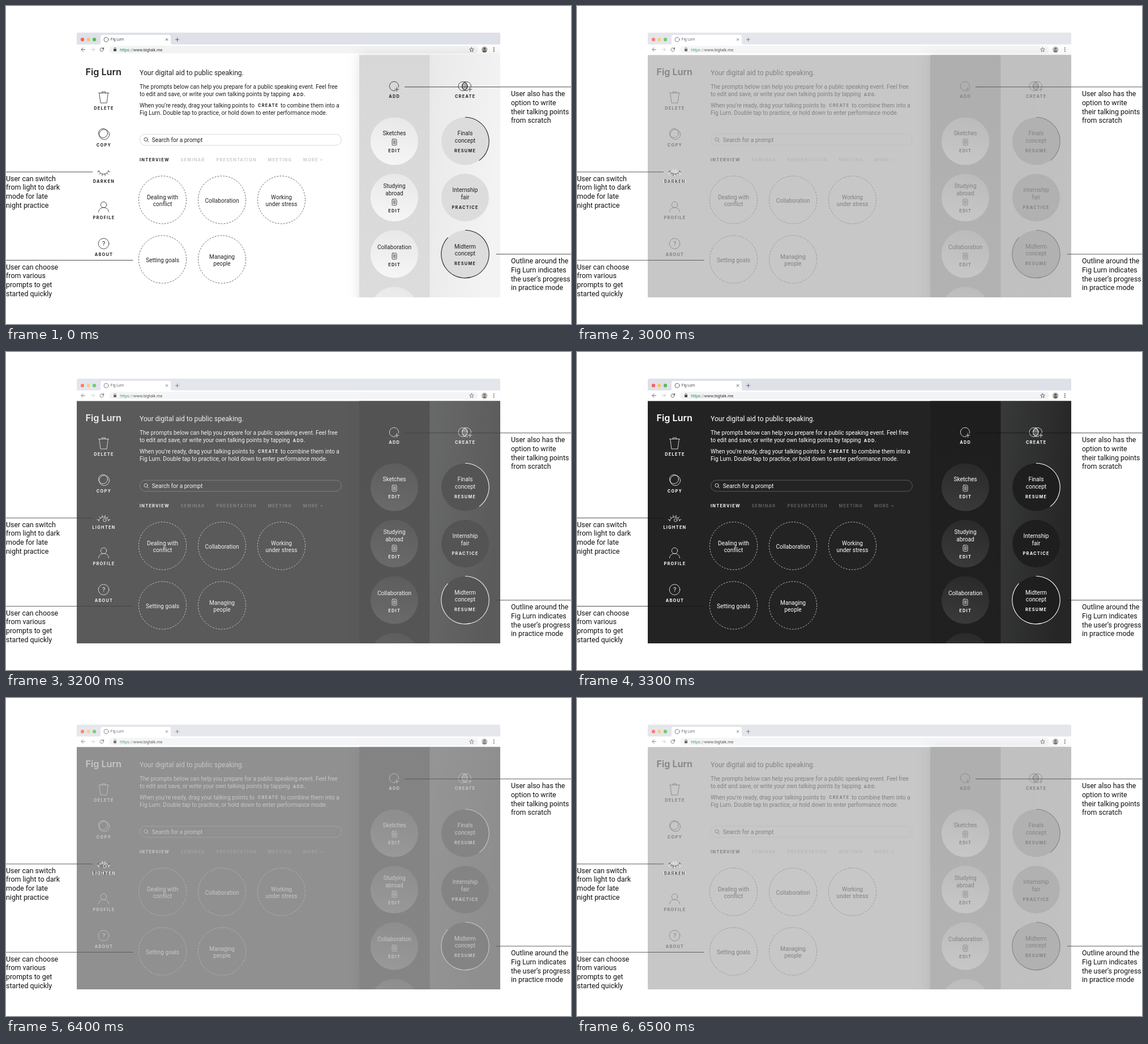
These frames come from a looping animation (998x561 px, 6.6 s). An HTML page:

```html
<!DOCTYPE html>
<html lang="en">
<head>
<meta charset="utf-8">
<title>Light and dark mode</title>
<style>
html, body { margin: 0; width: 100%; height: 100%; overflow: hidden; background: #fff; }
svg { display: block; width: 100%; height: 100%; }
text { font-family: Roboto, sans-serif; white-space: pre; }
.body { font-size: 10.15px; }
.head { font-size: 12.1px; }
.logo { font: 600 16.2px Inter, sans-serif; }
.cap { font: 700 7.3px Inter, sans-serif; letter-spacing: 1.3px; }
.note { font-size: 12.45px; fill: #111; }
.mid { text-anchor: middle; }
.icon { fill: none; stroke-width: .8; stroke-linecap: round; stroke-linejoin: round; }
</style>
</head>
<body>
<svg id="stage" viewBox="0 0 998 561" xmlns="http://www.w3.org/2000/svg"></svg>
<script>
const NAME = 'Fig Lurn';

const themes = {
  light: {
    ink: '#222', page: '#fff', tab: '#cbcbcb', field: '#d4d4d4',
    add: ['#d7d7d7', '#dcdcdc'], create: ['#e9e9e9', '#f3f3f3'],
    card: ['#e8e8e8', '#f6f6f6'], talk: '#dcdcdc', mode: 'DARKEN'
  },
  dark: {
    ink: '#fff', page: '#232323', tab: '#606060', field: '#626262',
    add: ['#1e1e1e', '#202020'], create: ['#383a39', '#262626'],
    card: ['#2a2a2a', '#3a3a3a'], talk: '#1e1e1e', mode: 'LIGHTEN'
  }
};

const text = (x, y, s, cls, extra = '') =>
  `<text x="${x}" y="${y}" class="${cls}" ${extra}>${s}</text>`;
const mid = (x, y, s) => text(x, y, s, 'body mid');
// the trailing letter space shifts centred capitals by half its width
const cap = (x, y, s) => text(x + .65, y, s, 'cap mid');
const circle = (x, y, r, extra = '') => `<circle cx="${x}" cy="${y}" r="${r}" ${extra}/>`;
const rect = (x, y, w, h, extra = '') =>
  `<rect x="${x}" y="${y}" width="${w}" height="${h}" ${extra}/>`;
const path = (d, extra = '') => `<path d="${d}" ${extra}/>`;
const plus = (x, y, r) => path(`M${x - r} ${y}h${2 * r}M${x} ${y - r}v${2 * r}`);
const gradient = (id, [a, b], dir) =>
  `<linearGradient id="${id}" ${dir}><stop stop-color="${a}"/><stop offset="1" stop-color="${b}"/></linearGradient>`;

// point at an angle in degrees, clockwise from the top
function polar(x, y, r, deg) {
  const a = deg * Math.PI / 180;
  return `${(x + r * Math.sin(a)).toFixed(2)} ${(y - r * Math.cos(a)).toFixed(2)}`;
}
const arc = (x, y, r, from, to, extra) =>
  path(`M${polar(x, y, r, from)}A${r} ${r} 0 ${to - from > 180 ? 1 : 0} 1 ${polar(x, y, r, to)}`, extra);
const ray = (x, y, r1, r2, deg) => path(`M${polar(x, y, r1, deg)}L${polar(x, y, r2, deg)}`);

function eye(mode) {
  if (mode === 'DARKEN') {
    const lashes = [115, 141, 167, 193, 219, 245].map(a => ray(172.5, 287.5, 9, 12.3, a));
    return arc(172.5, 287.5, 9, 108, 252) + lashes.join('');
  }
  const lashes = [-68, -40, -13, 13, 40, 68].map(a => ray(172.5, 300, 9, 12.3, a));
  return arc(172.5, 300, 9, -80, 80) + lashes.join('') + circle(174.3, 296.6, 2.7);
}

function sidebar(t) {
  const icons =
    path('M163.5 153.5H181.5M169.5 153.5V151.3H175.5V153.5M164.7 153.5L167 171H178L180.3 153.5') +
    circle(171.4, 224.4, 8) + circle(173.6, 226.6, 9) + eye(t.mode) +
    circle(172.5, 350.6, 5.2) + path('M163.6 363.4C163.8 352.8 181.2 352.8 181.4 363.4') +
    circle(172.5, 419.2, 9.3);
  const labels = ['DELETE', 'COPY', t.mode, 'PROFILE', 'ABOUT'];
  return text(140.5, 122, NAME, 'logo') + `<g class="icon" stroke="${t.ink}">${icons}</g>` +
    text(172.5, 423, '?', 'mid', 'font-size="11"') +
    labels.map((s, i) => cap(172.3, 183.4 + 64.3 * i, s)).join('');
}

function prompts(t) {
  const dashed = `fill="none" stroke="${t.ink}" stroke-width=".7" stroke-dasharray="2.8 2.2"`;
  const items = [
    [276.5, 342, 'Dealing with', 'conflict'], [381.5, 342, 'Collaboration'],
    [486.5, 342, 'Working', 'under stress'], [276.5, 447, 'Setting goals'],
    [381.5, 447, 'Managing', 'people']
  ];
  const tabs = [[308.5, 'SEMINAR'], [371.5, 'PRESENTATION'], [462.5, 'MEETING'], [524.8, 'MORE +']];
  return text(236, 121.6, 'Your digital aid to public speaking.', 'head') +
    text(236, 146.3, 'The prompts below can help you prepare for a public speaking event. Feel free', 'body') +
    text(236, 159.3, 'to edit and save, or write your own talking points by tapping', 'body') +
    text(506.8, 158.8, 'ADD.', 'cap') +
    text(236, 178.6, 'When you’re ready, drag your talking points to', 'body') +
    text(445, 178.1, 'CREATE', 'cap') + text(485, 178.6, 'to combine them into a', 'body') +
    text(236, 191.7, `${NAME}. Double tap to practice, or hold down to enter performance mode.`, 'body') +
    rect(236.3, 226.2, 356, 19.6, `rx="9.8" fill="none" stroke="${t.field}" stroke-width=".9"`) +
    `<g class="icon" stroke="${t.ink}">${circle(247, 235.3, 3.1)}${path('M249.3 237.6L251.8 240.1')}</g>` +
    text(257.8, 240, 'Search for a prompt', 'body') + text(236, 274.3, 'INTERVIEW', 'cap') +
    tabs.map(([x, s]) => text(x, 274.3, s, 'cap', `fill="${t.tab}"`)).join('') +
    items.map(([x, y, a, b]) => circle(x, y, 42.1, dashed) +
      (b ? mid(x, y - 1.5, a) + mid(x, y + 11.2, b) : mid(x, y + 4.5, a))).join('');
}

function doc(y, ink) {
  const rows = [-2.6, -.9, .8, 2.5].map(d => `M684 ${y + d}h4`).join('');
  return `<g class="icon" stroke="${ink}">${rect(682, y - 5.4, 8, 10.8, 'rx="1.6"')}${path(rows, 'stroke-width=".7"')}</g>`;
}

function columns(t, key) {
  const ring = `fill="none" stroke="${t.ink}" stroke-width="1.1"`;
  const card = y => circle(686, y, 42.1, `fill="url(#card-${key})"`);
  const talk = y => circle(811, y, 42, `fill="${t.talk}"`);
  const lens = path('M810.3 134.2A8 8 0 0 1 810.3 148.8A8 8 0 0 1 810.3 134.2Z', `fill="url(#hatch-${key})"`);
  const icons = arc(685.5, 141.5, 8.2, 163, 462) + plus(690.4, 147, 3.4) +
    circle(807, 141.5, 8) + arc(813.6, 141.5, 8, 163, 462) + lens + plus(819.4, 147, 3.4);
  return rect(624, 86.5, 124.7, 427.5, `fill="url(#add-${key})"`) +
    rect(748.5, 86.5, 124.5, 427.5, `fill="url(#create-${key})"`) +
    `<g class="icon" stroke="${t.ink}">${icons}</g>` +
    cap(685.5, 161.6, 'ADD') + cap(810.5, 161.6, 'CREATE') +
    [238.5, 338, 437.7, 537.5].map(card).join('') + [238.5, 338, 437.7].map(talk).join('') +
    mid(686, 227.8, 'Sketches') + doc(240.3, t.ink) + cap(685.5, 257.5, 'EDIT') +
    mid(686, 321, 'Studying') + mid(686, 333.6, 'abroad') + doc(346.2, t.ink) + cap(685.5, 363.6, 'EDIT') +
    mid(686, 429.2, 'Collaboration') + doc(441.4, t.ink) + cap(685.5, 459, 'EDIT') +
    mid(811, 228, 'Finals') + mid(811, 240.7, 'concept') + cap(810.5, 257.7, 'RESUME') +
    mid(811, 328, 'Internship') + mid(811, 340.6, 'fair') + cap(810.5, 357.6, 'PRACTICE') +
    mid(811, 427.7, 'Midterm') + mid(811, 440.3, 'concept') + cap(810.5, 457.3, 'RESUME') +
    arc(811, 238.5, 42.2, 0, 144, ring) + arc(811, 437.7, 42.2, 0, 314, ring);
}

function browser() {
  const lights = ['#fa6158', '#f8c667', '#52bd5c'].map((c, i) => circle(135 + 10.5 * i, 59.2, 3.1, `fill="${c}"`));
  const star = Array.from({ length: 10 }, (_, i) => polar(822.5, 77.2, i % 2 ? 1.8 : 4, 36 * i)).join('L');
  const dots = [74, 77, 80].map(y => circle(861.8, y, .9, 'fill="#444"')).join('');
  return path('M125 69V49.5Q125 47 127.5 47H870.5Q873 47 873 49.5V69Z', 'fill="#dfe1e9"') +
    lights.join('') + rect(125, 67.8, 748, 18.7, 'fill="#fff"') +
    path('M164 68Q167 68 167 65V54.5Q167 51 170.5 51H287.5Q291 51 291 54.5V65Q291 68 294 68Z', 'fill="#fff"') +
    text(184.8, 61.4, NAME, '', 'font-size="6.5" fill="#444"') +
    rect(182, 70.3, 652, 13.2, 'rx="6.6" fill="#f2f3f5"') +
    `<g class="icon" stroke="#444">${circle(177, 59.2, 4)}
      ${path('M282.2 57.4l3.6 3.6m0-3.6l-3.6 3.6')}${plus(302.5, 59.2, 3)}
      ${path('M139.6 76.8H133M136.2 73.6L133 76.8L136.2 80')}
      ${path('M149.8 76.8H156.4M153.2 73.6L156.4 76.8L153.2 80', 'stroke="#bbb"')}
      ${arc(169.3, 76.9, 3.2, 95, 405)}${path('M172.6 73.2V75.8H170', 'fill="#444"')}
      ${path('M191 76V74.8A1.5 1.5 0 0 1 194 74.8V76')}${path('M' + star + 'Z')}</g>` +
    rect(190, 75.8, 5, 4, 'rx=".5" fill="#444"') +
    text(201.3, 79.5, '<tspan fill="#249046">https</tspan><tspan fill="#888">://</tspan>www.bigtalk.me', '', 'font-size="7.25" fill="#333"') +
    circle(845.2, 76.8, 5.2, 'fill="#b3ada7"') + circle(845.2, 75.4, 2.1, 'fill="#665c58"') +
    path('M841.2 80.1Q845.2 75.8 849.2 80.1A5.2 5.2 0 0 1 841.2 80.1Z', 'fill="#665c58"') + dots;
}

function layer(key) {
  const t = themes[key];
  const defs = gradient('add-' + key, t.add, 'x2="0" y2="1"') +
    gradient('create-' + key, t.create, 'x2="1" y2=".35"') +
    gradient('card-' + key, t.card, 'x1=".6" x2=".4" y2="1"') +
    `<pattern id="hatch-${key}" width="2" height="2" patternUnits="userSpaceOnUse" patternTransform="rotate(-45)">
      ${rect(0, 0, .6, 2, `fill="${t.ink}"`)}</pattern>`;
  const shade = key === 'light' ? rect(624, 86, 260, 450, 'fill="#000" fill-opacity=".11" filter="url(#soft)"') : '';
  const page = rect(125, 86.5, 748, 427.5, `fill="${t.page}"`) + shade + sidebar(t) + prompts(t) + columns(t, key);
  const leaders = path('M0 292.8H153M0 448.5H224.5M704 142.8H998M866 437.8H998', 'stroke="#111" stroke-width=".75"');
  return `<defs>${defs}</defs><g id="${key}">${browser()}
    <g clip-path="url(#window)" fill="${t.ink}">${page}</g>${leaders}</g>`;
}

function notes() {
  const blocks = [
    [0, 308.8, 'User can switch', 'from light to dark', 'mode for late', 'night practice'],
    [0, 464.8, 'User can choose', 'from various', 'prompts to get', 'started quickly'],
    [892, 159.4, 'User also has the', 'option to write', 'their talking points', 'from scratch'],
    [892, 454.4, 'Outline around the', `${NAME} indicates`, 'the user’s progress', 'in practice mode']
  ];
  return blocks.map(([x, y, ...rows]) =>
    rows.map((s, i) => text(x, y + 15.6 * i, s, 'note')).join('')).join('');
}

document.getElementById('stage').innerHTML =
  `<defs><clipPath id="window">${rect(125, 68, 748, 446)}</clipPath>
    <filter id="soft" x="-30%" y="-20%" width="160%" height="140%"><feGaussianBlur stdDeviation="11"/></filter></defs>` +
  layer('light') + layer('dark') + notes();

const light = document.getElementById('light');
const dark = document.getElementById('dark');
const LOOP = 6600;

// 0 is fully light, 4 fully dark; each fade step lasts 100 ms
function level(ms) {
  if (ms < 3000) return 0;
  if (ms < 6300) return Math.min(4, Math.floor((ms - 3000) / 100) + 1);
  return 3 - Math.floor((ms - 6300) / 100);
}

let start;
function draw(now) {
  start ??= now;
  const mix = level((now - start) % LOOP) / 4;
  light.setAttribute('opacity', 1 - mix);
  dark.setAttribute('opacity', mix);
  requestAnimationFrame(draw);
}
requestAnimationFrame(draw);
</script>
</body>
</html>
```
